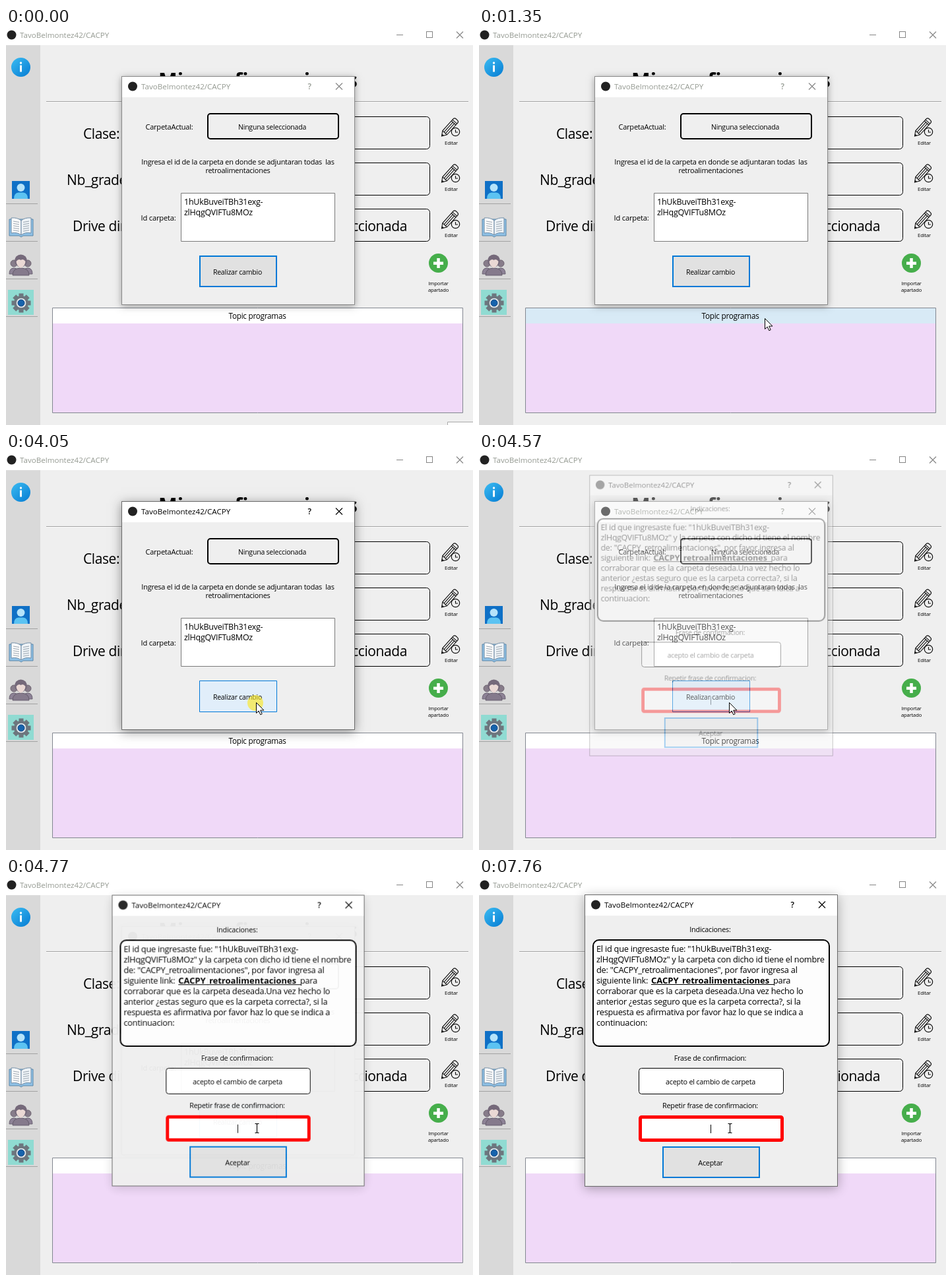
An HTML page with a canvas for the animation above (8000 ms loop, 708 by 602 pixels).

```html
<!DOCTYPE html>
<html lang="es">
<head>
<meta charset="utf-8">
<title>Configuraciones</title>
<style>
html, body { margin: 0; width: 100%; height: 100%; overflow: hidden; background: #efefef; }
canvas { display: block; }
</style>
</head>
<body>
<canvas id="stage" width="708" height="602"></canvas>
<script>
const W = 708, H = 602, LOOP = 8000;
const FONT = '"Open Sans", "Noto Sans", sans-serif';
const APP = 'TavoBelmontez42/CACPY';
const BG = '#efefef', BLUE = '#0078d7';

const screen = document.getElementById('stage').getContext('2d');
const layer = Object.assign(document.createElement('canvas'), { width: W, height: H }).getContext('2d');
let g = screen;

const mix = (a, b, p) => a + (b - a) * p;
// Index of the current step when n changes are spread evenly from a to b; -1 before a
const stepAt = (t, a, b, n) => t < a ? -1 : Math.min(n - 1, Math.floor((t - a) / (b - a) * (n - 1) + 0.05));
const rgb = (a, b, p) => `rgb(${a.map((v, i) => Math.round(mix(v, b[i], p)))})`;

function text(s, x, y, size, { align = 'left', color = '#000', weight = 400, track = -0.02 } = {}) {
  g.font = `${weight} ${size}px ${FONT}`;
  g.letterSpacing = `${track * size}px`;
  g.textAlign = align;
  g.fillStyle = color;
  g.fillText(s, x, y);
}
const label = (s, x, y, size = 10.8) => text(s, x, y, size, { align: 'center' });

function rect(x, y, w, h, color) {
  g.fillStyle = color;
  g.fillRect(x, y, w, h);
}

// Bordered box whose outer edges are x, y, w, h
function box(x, y, w, h, fill, line, lw = 1, r = 0) {
  g.beginPath();
  g.roundRect(x + lw / 2, y + lw / 2, w - lw, h - lw, r);
  g.fillStyle = fill;
  g.fill();
  g.strokeStyle = line;
  g.lineWidth = lw;
  g.stroke();
}

function disc(x, y, r, fill, line, lw = 1) {
  g.beginPath();
  g.arc(x, y, r, 0, 7);
  if (fill) { g.fillStyle = fill; g.fill(); }
  if (line) { g.strokeStyle = line; g.lineWidth = lw; g.stroke(); }
}

function shape(d, fill, line, lw = 1) {
  const p = new Path2D(d);
  if (fill) { g.fillStyle = fill; g.fill(p); }
  if (line) { g.strokeStyle = line; g.lineWidth = lw; g.stroke(p); }
}

const cross = (x, y, r, color) => shape(`M${x - r} ${y - r}L${x + r} ${y + r}M${x + r} ${y - r}L${x - r} ${y + r}`, null, color, 1.1);

function at(x, y, draw) {
  g.save();
  g.translate(x, y);
  draw();
  g.restore();
}

function infoIcon() {
  const grad = g.createLinearGradient(12, 48, 33, 72);
  grad.addColorStop(0, '#35b4ee');
  grad.addColorStop(1, '#0b82d6');
  disc(22.5, 59.5, 14.5, grad);
  disc(22.5, 53, 1.7, '#fff');
  rect(21, 56.5, 3, 10, '#fff');
}

function userIcon() {
  rect(9, 232, 27, 27, '#0f70c6');
  shape('M12 259Q12 250 19 249.500H26Q33 250 33 259Z', '#5cc3f2');
  disc(22.5, 242, 6, '#b5e3fa');
}

function bookIcon() {
  shape('M5 290H41V315H26L23 317L20 315H5Z', '#8fc1e6', '#5b86a8');
  shape('M8 288Q17 287 23 292V314Q17 309 8 311Z', '#fbfbfb', '#6f8ba5');
  shape('M38 288Q29 287 23 292V314Q29 309 38 311Z', '#eef3f7', '#6f8ba5');
  for (let i = 0; i < 5; i++) {
    const y = 293 + i * 3.4;
    shape(`M11 ${y}L20 ${y + 1.5}M35 ${y}L26 ${y + 1.5}`, null, '#8e9aa6', 0.9);
  }
}

function groupIcon() {
  for (const x of [12, 33]) {
    disc(x, 357, 5, '#877c8a', '#6e6470');
    shape(`M${x - 7} 373Q${x - 7} 364 ${x} 364T${x + 7} 373Z`, '#8d8296', '#6a6272');
  }
  shape('M10 375Q10 364 22.500 364T35 375Z', '#857a8c', '#655c6c');
  disc(22.5, 353, 9.5, '#75697a');
  shape('M15.500 354Q19 349 22.500 352Q26 349 29.500 354Q29 361 22.500 364Q16 361 15.500 354Z', '#ead8d4');
}

function gearIcon() {
  rect(3, 397, 39, 38, '#90dbd2');
  at(23, 417, () => {
    g.fillStyle = '#6d767e';
    for (let i = 0; i < 8; i++) {
      g.fillRect(-3.5, -14.5, 7, 8);
      g.rotate(Math.PI / 4);
    }
    disc(0, 0, 11, '#6d767e');
    disc(0, 0, 7.3, '#e3e9ee');
    disc(0, 0, 5, '#1763ac', '#10457e');
  });
}

function editIcon(y) {
  at(660.5, y + 30, () => {
    g.rotate(-Math.PI / 4 - 0.05);
    shape('M0 0L7 -4.500H31Q34 -4.500 34 -1.500V1.500Q34 4.500 31 4.500H7ZM7 -4.500V4.500M27 -4.500V4.500M29.500 -4.500V4.500M7 -1.500H27M7 1.500H27', BG, '#111', 1.1);
    shape('M0 0L3 -2V2Z', '#111');
  });
  disc(681.5, y + 23.5, 6.2, BG, '#111', 1.2);
  shape(`M681.500 ${y + 20}V${y + 24}H685`, null, '#111', 1.1);
  label('Editar', 675, y + 43, 7.6);
}

function background(headerHover) {
  rect(0, 0, W, H, BG);
  rect(0, 0, W, 26, '#fff');
  disc(8.5, 10.5, 7, '#222');
  text(APP, 21, 15, 11.6, { color: '#959a92', track: 0 });
  rect(592, 10, 10, 1, '#858585');
  g.strokeStyle = '#858585';
  g.lineWidth = 1;
  g.strokeRect(637.5, 5.5, 9, 9);
  cross(688, 10.5, 5, '#858585');

  rect(0, 26, 52, H - 26, '#d9d9d9');
  for (let i = 0; i < 4; i++) rect(0, 266 + i * 57, 48, 1, '#a2a2a2');
  infoIcon();
  userIcon();
  bookIcon();
  groupIcon();
  gearIcon();

  text('Mis configuraciones', 382, 90, 30.4, { align: 'center', weight: 700, track: 0 });
  rect(61, 111, 640, 1, '#a0a0a0');
  rect(61, 112, 640, 1, '#fff');
  text('Clase:', 117, 168, 21);
  text('Nb_grade:', 92, 238, 21);
  text('Drive direccion:', 101, 308, 21);
  for (const y of [134, 204, 274]) {
    box(367, y, 276, 50, BG, '#000', 1, 5);
    editIcon(y);
  }
  text('Ninguna seleccionada', 608, 308, 21, { align: 'right' });

  disc(655.5, 356.5, 14.5, '#46ae4b');
  rect(648, 354.5, 15, 4.5, '#fff');
  rect(653.3, 349, 4.5, 15, '#fff');
  label('Importar', 655.5, 390, 7.6);
  label('apartado', 655.5, 400, 7.6);

  box(70, 424, 623, 160, '#f0d9f8', '#828790');
  rect(71, 425, 621, 23, headerHover ? '#d8eaf6' : '#fff');
  label('Topic programas', 381, 441, 11.7);
}

function windowFrame(x, y, w, h, active, shade) {
  g.save();
  g.shadowColor = `rgba(0,0,0,${shade})`;
  g.shadowBlur = active ? 16 : 10;
  g.shadowOffsetY = active ? 3 : 2;
  rect(x, y, w, h, '#777');
  g.restore();
  box(x, y, w, h, BG, active ? '#6a6a6a' : '#8a8a8a');
  rect(x + 1, y + 1, w - 2, 31, '#fff');
  const ink = active ? '#000' : '#959a92', cy = y + 15.5;
  disc(x + 17, cy, 7, '#222');
  text(APP, x + 30, cy + 4.5, 11.6, { color: ink, track: 0 });
  text('?', x + w - 69, cy + 4.5, 12, { align: 'center', color: ink, weight: 600 });
  cross(x + w - 24, cy, 5, active ? '#000' : '#858585');
}

function folderDialog(t, hover) {
  const active = t >= 4050 && t < 4570;
  windowFrame(175, 73, 354, 347, active, active ? 0.4 : 0.35);
  label('CarpetaActual:', 247.5, 154, 11);
  box(305, 129, 200, 40, BG, '#000', 2, 4);
  label('Ninguna seleccionada', 403.5, 154, 10.5);
  label('Ingresa el id de la carpeta en donde se adjuntaran todas  las', 351.5, 207, 10.95);
  label('retroalimentaciones', 351.5, 220, 10.95);
  label('Id carpeta:', 231, 292, 11.2);
  box(265, 250, 234, 74, '#fff', '#7a7a7a');
  text('1hUkBuveiTBh31exg-', 270, 268, 12.5);
  text('zlHqgQVIFTu8MOz', 270, 284, 12.5);

  const press = (stepAt(t, 4050, 4170, 3) + 1) / 3;
  const fill = press > 0
    ? rgb([229, 241, 251], [216, 233, 248], press)
    : rgb([225, 225, 225], [229, 241, 251], hover);
  box(293, 345, 118, 48, fill, BLUE, hover > 0 ? 1 : 2);
  label('Realizar cambio', 351, 374, 10.5);
}

function confirmDialog(caret, shade) {
  windowFrame(160, 25, 384, 443, true, shade);
  label('Indicaciones:', 350.5, 82);
  box(172, 93, 360, 163, '#fdfdfd', '#000', 2, 9);
  const lines = [
    'El id que ingresaste fue: "1hUkBuveiTBh31exg-',
    'zlHqgQVIFTu8MOz" y la carpeta con dicho id tiene el nombre',
    'de: "CACPY_retroalimentaciones", por favor ingresa al',
    'siguiente link:',
    'corraborar que es la carpeta deseada.Una vez hecho lo',
    'anterior ¿estas seguro que es la carpeta correcta?, si la',
    'respuesta es afirmativa por favor haz lo que se indica a',
    'continuacion:'
  ];
  lines.forEach((s, i) => text(s, 178, 112 + i * 16, 12.8));
  text('CACPY_retroalimentaciones', 261, 160, 13, { weight: 700, track: 0 });
  rect(261, 161, 186, 1, '#000');
  text('para', 446, 160, 12.8);

  label('Frase de confirmacion:', 350.5, 277);
  box(242, 288, 220, 40, '#fff', '#000', 1, 4);
  label('acepto el cambio de carpeta', 351, 313);
  label('Repetir frase de confirmacion:', 350.5, 349);
  box(242, 360, 220, 40, '#fff', '#f00', 5, 2);
  if (caret) rect(351, 374, 1, 13, '#000');
  box(278, 407, 148, 48, '#e1e1e1', BLUE, 2);
  label('Aceptar', 351, 436);
}

// Draws a window as one group so that it fades and scales as a whole
function fade(alpha, scale, draw) {
  layer.clearRect(0, 0, W, H);
  g = layer;
  draw();
  g = screen;
  g.save();
  g.globalAlpha = alpha;
  g.translate(352, 246.5);
  g.scale(scale, scale);
  g.drawImage(layer.canvas, -352, -246.5);
  g.restore();
}

function pointer(t) {
  const k = stepAt(t, 1000, 1760, 12);
  if (k < 0) return null;
  if (k <= 5) {
    const p = 1 - (1 - k / 5) ** 1.5;
    return [mix(697, 433, p), mix(594, 440, p)];
  }
  const j = stepAt(t, 1810, 2030, 4) + 1;
  if (!j) {
    const p = (k - 5) / 6;
    return [mix(433, 395, p), mix(440, 391, p)];
  }
  return [mix(395, 379, j / 4), mix(391, 378, j / 4)];
}

const arrow = (x, y) => at(x + 0.5, y + 0.5, () =>
  shape('M0 0V16L3.700 12.600L6.300 18.300L8.700 17.200L6.200 11.600H11.400Z', '#fff', '#000'));

const beam = (x, y) => shape(`M${x - 3} ${y - 7}H${x - 1}L${x} ${y - 6}L${x + 1} ${y - 7}H${x + 3}M${x} ${y - 6}V${y + 6}M${x - 3} ${y + 7}H${x - 1}L${x} ${y + 6}L${x + 1} ${y + 7}H${x + 3}`, null, '#000', 1.1);

function draw(t) {
  const pos = pointer(t);
  const hover = t < 1760 ? 0 : (stepAt(t, 1810, 2030, 4) + 2) / 5;
  background(pos && pos[1] > 424 && pos[1] < 448);

  const tip = t < 70 ? 1 : t < 600 ? 0.5 : t < 670 ? 0.25 : 0;
  if (tip) {
    g.globalAlpha = tip;
    box(669, 597, 50, 20, '#fff', '#a8a8a8');
    g.globalAlpha = 1;
  }

  folderDialog(t, hover);
  const open = (stepAt(t, 4570, 4840, 5) + 1) / 5;
  if (open) {
    const left = (1 - open) ** 2;
    const caret = t < 5100 || Math.floor((t - 5100) / 530) % 2 === 1;
    fade(1 - left, 1 - 0.059 * left, () => confirmDialog(caret, 0.3 * open ** 3));
  }

  if (t >= 4050 && t < 4370) disc(378, 379, 12, 'rgba(250,232,40,.65)');
  if (t >= 4640) beam(380.5, 379.5);
  else if (pos) arrow(...pos);
}

function tick(now) {
  draw(now % LOOP);
  requestAnimationFrame(tick);
}
requestAnimationFrame(tick);
</script>
</body>
</html>
```
